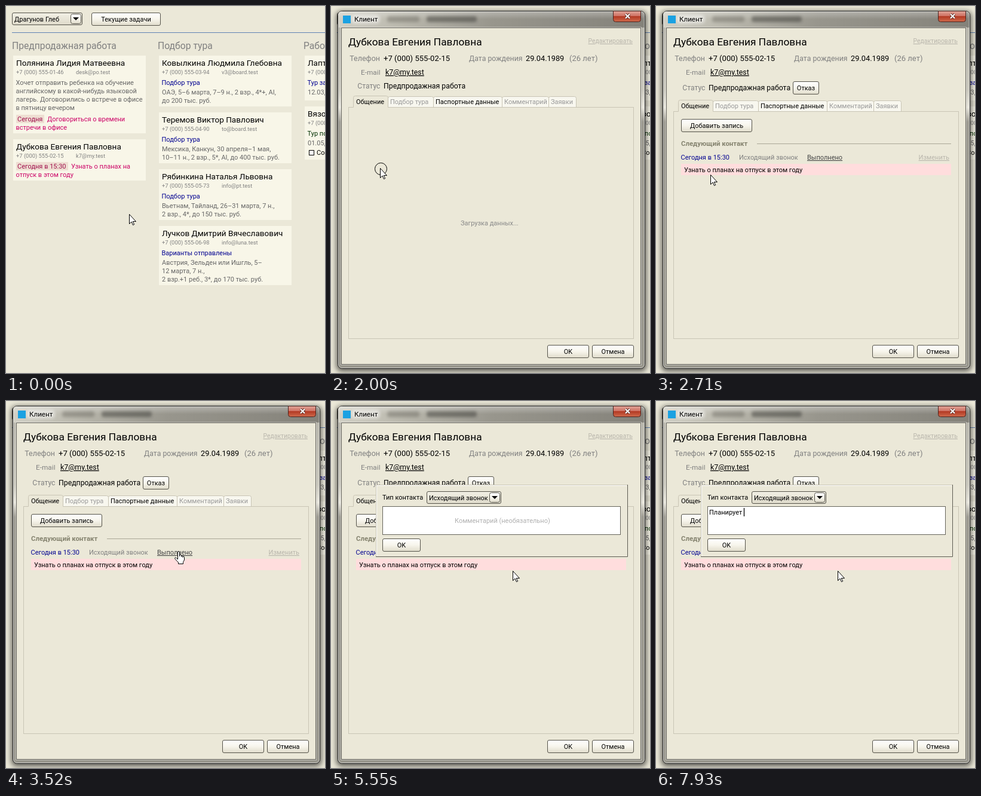
Recreate the animation shown at these times as an HTML page. Size 534 by 614 pixels, loop 8000 ms.

```html
<!DOCTYPE html>
<html lang="ru">
<head>
<meta charset="utf-8">
<title>Клиент</title>
<style>
html, body { margin: 0; width: 100%; height: 100%; overflow: hidden; background: #ebe8d8 }
svg { display: block; font-family: Roboto, "Noto Sans", sans-serif }
text { white-space: pre }
.u { text-decoration: underline }
.b { font-weight: bold }
.m { text-anchor: middle }
.e { text-anchor: end }
</style>
</head>
<body>
<svg id="stage" width="534" height="614" viewBox="0 0 534 614"></svg>
<script>
const GRAY = '#808080', BODY = '#666', NAVY = '#000090', PINK = '#cc0066', PALE = '#b9b6ac';

const T = (x, y, size, str, fill = '#000', cls = '') =>
  `<text x="${x}" y="${y}" font-size="${size}" fill="${fill}" class="${cls}">${str}</text>`;
const R = (x, y, w, h, fill, more = '') =>
  `<rect x="${x}" y="${y}" width="${w}" height="${h}" fill="${fill}" ${more}/>`;
const lines = (x, y, list, fill) => list.map((s, i) => T(x, y + i * 14, 11, s, fill)).join('');
const box = (x, y, w, h, fill, rx = 2.5) =>
  R(x + .5, y + .5, w - 1, h - 1, fill, `rx="${rx}" stroke="#55534a"`);
const button = (x, y, w, h, label) =>
  box(x, y, w, h, 'url(#face)') + T(x + w / 2, y + h / 2 + 4, 11, label, '#000', 'm');
const combo = (x, y, w, label) =>
  box(x, y, w, 21, 'url(#field)') + T(x + 4, y + 14.5, 11, label) +
  box(x + w - 20, y + 2, 18, 17, 'url(#face)', 3) +
  `<path d="M${x + w - 16} ${y + 8}h10l-5 5z"/>`;

const card = (x, y, h, name, phone, mail) =>
  R(x, y, 222, h, '#f8f6e8') + T(x + 5, y + 16.5, 13.6, name) +
  T(x + 5, y + 31, 9.4, phone, GRAY) + T(x + 105, y + 31, 9.4, mail, GRAY);
const tourCard = (x, y, h, name, phone, mail, state, info, tint = NAVY) =>
  card(x, y, h, name, phone, mail) +
  T(x + 4.5, y + 49, 11, state, tint) + lines(x + 5, y + 65, info, BODY);
const reminder = (y, w, tag, x, first, second) =>
  R(17, y - 11, w, 14, '#eeded2') + T(19, y, 11, tag, '#a0104c') +
  T(x, y, 11, first, PINK) + T(16.5, y + 14, 11, second, PINK);

const defs = `<defs>
  <linearGradient id="face" x2="0" y2="1"><stop stop-color="#fff"/><stop offset=".5" stop-color="#f7f5ec"/><stop offset="1" stop-color="#e0dccb"/></linearGradient>
  <linearGradient id="field" x2="0" y2="1"><stop stop-color="#f2f0e5"/><stop offset="1" stop-color="#dedaca"/></linearGradient>
  <linearGradient id="bar"><stop stop-color="#d2d0c5"/><stop offset=".2" stop-color="#bbb9ae"/><stop offset=".5" stop-color="#98968d"/><stop offset="1" stop-color="#84827a"/></linearGradient>
  <linearGradient id="side" x2="0" y2="1"><stop stop-color="#b3b1a7"/><stop offset=".22" stop-color="#c9c7bc"/><stop offset=".27" stop-color="#e6e4da"/><stop offset=".31" stop-color="#9b998f"/><stop offset="1" stop-color="#98968c"/></linearGradient>
  <linearGradient id="gloss" x2="0" y2="1"><stop stop-color="#fff" stop-opacity=".3"/><stop offset="1" stop-color="#fff" stop-opacity="0"/></linearGradient>
  <linearGradient id="close" x2="0" y2="1"><stop stop-color="#e0a498"/><stop offset=".45" stop-color="#cf7264"/><stop offset=".5" stop-color="#b33a24"/><stop offset="1" stop-color="#cf6a4c"/></linearGradient>
  <filter id="blur" x="-20%" y="-100%" width="140%" height="300%"><feGaussianBlur stdDeviation="2.5"/></filter>
  <filter id="shade" x="-10%" y="-10%" width="120%" height="120%"><feGaussianBlur stdDeviation="5"/></filter>
</defs>`;

const board = R(0, 0, 534, 614, '#ebe8d8') +
  combo(10, 11, 118, 'Драгунов Глеб') + button(143, 11, 116, 22, 'Текущие задачи') +
  R(10, 44, 524, 1, '#5f82b4') +
  T(10, 72, 15.7, 'Предпродажная работа', GRAY) + T(254, 72, 15.7, 'Подбор тура', GRAY) +
  T(498, 72, 15.7, 'Работа', GRAY) +
  card(12, 83, 130, 'Полянина Лидия Матвеевна', '+7 (000) 555-01-46', 'desk@po.test') +
  lines(16.5, 132, ['Хочет отправить ребенка на обучение', 'английскому в какой-нибудь языковой',
    'лагерь. Договорились о встрече в офисе', 'в пятницу вечером'], BODY) +
  reminder(193, 47, 'Сегодня', 69, 'Договориться о времени', 'встречи в офисе') +
  card(12, 223, 69, 'Дубкова Евгения Павловна', '+7 (000) 555-02-15', 'k7@my.test') +
  reminder(272, 87, 'Сегодня в 15:30', 109, 'Узнать о планах на', 'отпуск в этом году') +
  tourCard(256, 83, 85, 'Ковылкина Людмила Глебовна', '+7 (000) 555-03-94', 'v3@board.test', 'Подбор тура',
    ['ОАЭ, 5–6 марта, 7–9 н., 2 взр., 4*+, AI,', 'до 200 тыс. руб.']) +
  tourCard(256, 178, 85, 'Теремов Виктор Павлович', '+7 (000) 555-04-90', 'to@board.test', 'Подбор тура',
    ['Мексика, Канкун, 30 апреля–1 мая,', '10–11 н., 2 взр., 5*, AI, до 400 тыс. руб.']) +
  tourCard(256, 273, 85, 'Рябинкина Наталья Львовна', '+7 (000) 555-05-73', 'info@pt.test', 'Подбор тура',
    ['Вьетнам, Тайланд, 26–31 марта, 7 н.,', '2 взр., 4*, до 150 тыс. руб.']) +
  tourCard(256, 368, 99, 'Лучков Дмитрий Вячеславович', '+7 (000) 555-06-98', 'info@luna.test', 'Варианты отправлены',
    ['Австрия, Зельден или Ишгль, 5–', '12 марта, 7 н.,', '2 взр.+1 реб., 3*, до 170 тыс. руб.']) +
  tourCard(500, 83, 75, 'Лаптина', '+7 (000) 555', '', 'Тур забронирован', ['12.03, 7 н.']) +
  tourCard(500, 168, 89, 'Вязова', '+7 (000) 555', '', 'Тур подтвержден', ['01.05, 7 н.'], '#003000') +
  R(507.5, 241.5, 8, 8, '#fff', 'stroke="#000"') + T(520, 249, 11, 'Состав');

const dialog =
  R(9, 9, 519, 602, '#000', 'rx="8" opacity=".62" filter="url(#shade)"') +
  R(11.5, 8.5, 514, 598, 'url(#side)', 'rx="7" stroke="#1f1f1d"') +
  `<path d="M12 36V15q0-6 6-6H519q6 0 6 6V36z" fill="url(#bar)"/>` +
  R(13, 10, 511, 12, 'url(#gloss)', 'rx="5"') +
  R(94, 17, 54, 10, '#55534c', 'rx="4" opacity=".35" filter="url(#blur)"') +
  R(160, 17, 84, 10, '#33322e', 'rx="4" opacity=".45" filter="url(#blur)"') +
  R(34, 15, 48, 14, '#fff', 'rx="6" opacity=".5" filter="url(#blur)"') +
  R(12.5, 9.5, 512, 596, 'none', 'rx="6" stroke="#fff" stroke-opacity=".55"') +
  R(20, 16, 13, 13, '#1ba1e2') + T(39, 26, 11.6, 'Клиент') +
  `<path d="M472.5 8.5H518.5V22.5q0 4-4 4H476.5q-4 0-4-4z" fill="url(#close)" stroke="#4a2420"/>
   <path d="M493 13.5l7 7m0-7l-7 7" stroke="#5a2a24" stroke-width="4"/>
   <path d="M493 13.5l7 7m0-7l-7 7" stroke="#fff" stroke-width="2.2"/>` +
  R(16.5, 35.5, 503, 565, 'none', 'stroke="#fff" stroke-opacity=".4"') +
  R(17.5, 36.5, 501, 563, '#ebe8d8', 'stroke="#65635b"') +
  T(29, 65.5, 17.3, 'Дубкова Евгения Павловна') + T(505, 62, 10.4, 'Редактировать', PALE, 'u e') +
  T(82, 92, 12.5, 'Телефон', GRAY, 'e') + T(88, 92, 13.1, '+7 (000) 555-02-15') +
  T(231, 92, 12.3, 'Дата рождения', GRAY) + T(326, 92, 12.8, '29.04.1989') + T(399, 92, 13, '(26 лет)', GRAY) +
  T(82.5, 115, 11.8, 'E-mail', GRAY, 'e') + T(91, 115, 12.4, 'k7@my.test', '#000', 'u') +
  button(362, 567, 70, 22, 'OK') + button(437, 567, 70, 22, 'Отмена');

const tab = (x, y, w, label, fill) =>
  `<path d="M${x + .5} ${y}v-15q0-3 3-3h${w - 6}q3 0 3 3v15" fill="#f8f7ef" stroke="#c9c5b5"/>` +
  T(x + 4, y - 5.5, 11, label, fill);

// status line and tab panel, whose top edge is at y
const page = (statusY, y) =>
  T(82.5, statusY, 12.2, 'Статус', GRAY, 'e') + T(88, statusY, 12.3, 'Предпродажная работа') +
  tab(95, y, 76, 'Подбор тура', '#999') + tab(171, y, 115, 'Паспортные данные', '#000') +
  tab(286, y, 78, 'Комментарий', '#999') + tab(364, y, 46, 'Заявки', '#999') +
  R(29.5, y, 477, 556.5 - y, '#ebe8d8', 'stroke="#c9c5b5"') +
  `<path d="M37.5 ${y + 1}v-17q0-3 3-3h52q3 0 3 3v17" fill="#ebe8d8"/>
   <path d="M37.5 ${y}v-16q0-3 3-3h52q3 0 3 3v16" fill="none" stroke="#c9c5b5"/>` +
  T(42, y - 5.5, 11, 'Общение');

const contact = button(229, 126, 44, 22, 'Отказ') + button(42, 189, 119, 22, 'Добавить запись') +
  T(42, 234, 11.4, 'Следующий контакт', '#85836f', 'b') + R(169, 230, 325, 1, '#aaa797') +
  T(41.5, 257, 11, 'Сегодня в 15:30', NAVY) + T(139, 257, 11, 'Исходящий звонок', GRAY) +
  T(253, 257, 11, 'Выполнено', '#444', 'u') + T(491, 257, 11, 'Изменить', PALE, 'u e') +
  R(42, 264, 452, 19, '#ffdddd') + T(47, 278, 11, 'Узнать о планах на отпуск в этом году');

const popup = R(75, 140, 422, 121, '#ebe8d8') +
  `<path d="M75.5 260V140.5H496" fill="none" stroke="#c9c5b5"/><path d="M76.5 259V141.5H495" fill="none" stroke="#fff"/>
   <path d="M75 260.5H496.5V140" fill="none" stroke="#5d5b52"/>` +
  T(86, 165, 11, 'Тип контакта') + combo(160, 151, 125, 'Исходящий звонок') +
  R(86.5, 176.5, 398, 47, '#fff', 'stroke="#66645b"') + button(86, 230, 64, 22, 'OK');

const layer = (id, content) => `<g id="${id}">${content}</g>`;
stage.innerHTML = defs + board +
  layer('win', dialog +
    layer('loading', page(137.5, 169.5) + T(217, 367, 11, 'Загрузка данных...', '#888')) +
    layer('record', page(141, 176.5) + contact) +
    layer('form', popup + layer('hint', T(207, 204, 11, 'Комментарий (необязательно)', '#b0b0b0')) +
      '<text id="typed" x="89" y="190" font-size="11"/>' +
      '<path id="caret" d="M.5 179v14" stroke="#000" stroke-width="1.3"/>')) +
  layer('pointer',
    '<circle id="busy" cx="1.5" cy="1.5" r="10" fill="none" stroke="#000"/>' +
    '<path id="arrow" d="M.5.5V16.5L4 13l2.5 5.5 2.2-1-2.5-5H11.5z" fill="#fff" stroke="#000"/>' +
    '<path id="hand" transform="translate(-5)" fill="#fff" stroke="#000" d="M5.5 14V2a1.5 1.5 0 0 1 3 0V9 7.5a1.5 1.5 0 0 1 3 .5V9.5 8.5a1.4 1.4 0 0 1 2.5.5V10.5 9.8a1.3 1.3 0 0 1 2.5.7V15L14.5 18.5V21.5H6.5V19L1.2 13.5C-.2 11.2 2 10 3.5 11.8z"/>');

// start time, hot spot, hand cursor
const moves = [
  [0, 206, 348], [310, 190, 340], [430, 142, 316], [550, 99, 287, 1], [700, 87, 277, 1], [850, 83, 272, 1],
  [1000, 82, 271, 1], [2000, 82, 271], [2710, 91, 282], [2830, 109, 294], [2980, 165, 304], [3100, 228, 310],
  [3250, 292, 284], [3370, 290, 255, 1], [3520, 287, 251, 1], [4080, 287, 251], [4350, 291, 258],
  [4470, 300, 275], [4590, 304, 284]];
// start time, letters typed
const keys = [[0, 0], [6230, 1], [6540, 3], [6840, 4], [6960, 5], [7260, 6], [7390, 7], [7540, 8], [7660, 9], [7930, 10]];
const blinks = [4080, 4590, 5120, 5550, 6110];
const note = 'Планирует\u00a0';

const at = (list, t) => list.findLast(item => item[0] <= t);
const show = (el, on) => el.style.display = on ? '' : 'none';
const $ = id => document.getElementById(id);

function draw() {
  const t = performance.now() % 8000;
  const [, x, y, isHand] = at(moves, t);
  const count = at(keys, t)[1];

  show($('win'), t >= 2000);
  show($('loading'), t < 2150);
  show($('record'), t >= 2150);
  show($('form'), t >= 4080);
  show($('hint'), !count);
  $('typed').textContent = note.slice(0, count);

  show($('caret'), blinks.filter(b => b <= t).length % 2);
  const width = count ? $('typed').getComputedTextLength() : 1;
  $('caret').setAttribute('transform', `translate(${Math.round(89 + width)})`);

  $('pointer').setAttribute('transform', `translate(${x} ${y})`);
  show($('hand'), isHand);
  show($('arrow'), !isHand);
  show($('busy'), t >= 2000 && t < 2150);
  requestAnimationFrame(draw);
}
draw();
</script>
</body>
</html>
```
